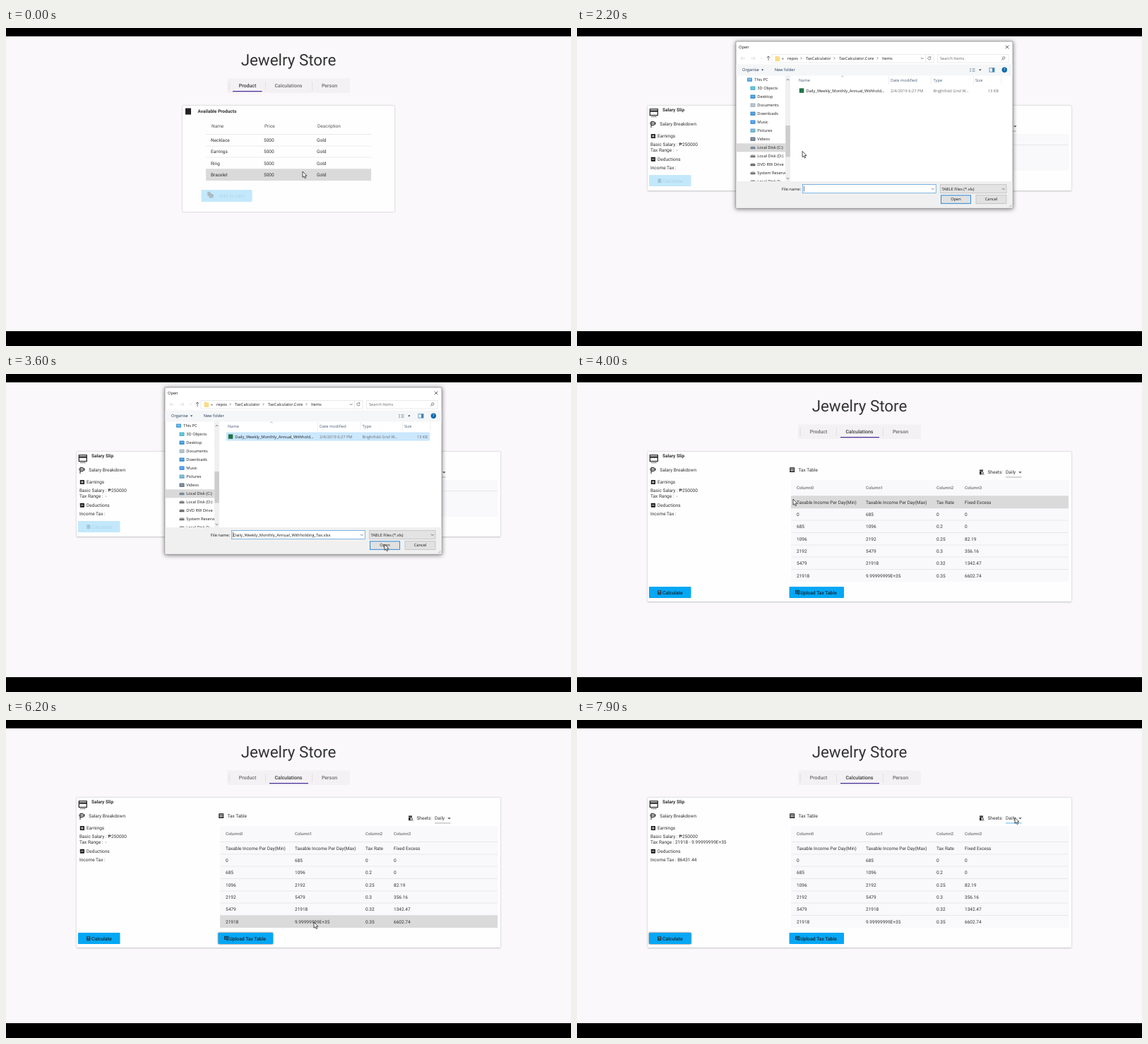
An HTML page that plays this animation: 800 by 450 pixels, repeating every 8000 ms.

```html
<!DOCTYPE html>
<html lang="en">
<head>
<meta charset="utf-8">
<title>Jewelry Store</title>
<style>
  html, body { margin: 0; height: 100%; overflow: hidden; background: #faf8fb; }
  svg { position: fixed; inset: 0; width: 100%; height: 100%; }
  text { font: 6.5px Roboto, sans-serif; fill: #333; text-rendering: geometricPrecision; white-space: pre; }
  .card { fill: #fefefe; filter: drop-shadow(0 .8px .7px #0007) drop-shadow(0 .4px 1.2px #0004); }
  .win text { font-family: "Open Sans", "Noto Sans", sans-serif; }
  .frame { filter: drop-shadow(0 1px 3px #0008); }
  .focus { filter: drop-shadow(0 .8px .8px #000a); }
</style>
</head>
<body>
<svg id="stage" viewBox="0 0 800 450"></svg>
<script>
const LOOP = 8000, STEP = 100;

// Markup helpers: text is placed by its vertical centre.
const text = (x, cy, s, o = {}) => {
  const size = o.size || 6.5;
  return `<text x="${x}" y="${cy + size * 0.355}" style="font-size:${size}px;font-weight:${o.weight || 400};` +
    `${o.fill ? `fill:${o.fill};` : ''}text-anchor:${o.anchor || 'start'}"${o.id ? ` id="${o.id}"` : ''}>${s}</text>`;
};
const label = (x, cy, s, fill = '#1b1b1b', anchor) => text(x, cy, s, { size: 5.7, fill, anchor });
const rect = (x, y, w, h, fill, more = '') => `<rect x="${x}" y="${y}" width="${w}" height="${h}" fill="${fill}" ${more}/>`;
const box = (x, y, w, h, fill, stroke, sw = 0.6, more = '') =>
  rect(x, y, w, h, fill, `stroke="${stroke}" stroke-width="${sw}" ${more}`);
const fillPath = (d, fill = '#222') => `<path d="${d}" fill="${fill}"/>`;
const line = (d, stroke = '#222', sw = 0.8) => `<path d="${d}" fill="none" stroke="${stroke}" stroke-width="${sw}"/>`;
const group = (id, body, more = '') => `<g id="${id}" ${more}>${body}</g>`;

const products = {
  left: 283, right: 517, edges: [150.5, 167, 183, 199.5, 216], cols: [290, 365, 440],
  rows: ['Necklace', 'Earrings', 'Ring', 'Bracelet'].map(n => [n, '5000', 'Gold'])
};
const taxes = {
  left: 303, right: 696, edges: [172.5, 190, 207, 224.5, 242, 259, 276.5, 294], cols: [311, 409, 509, 549],
  rows: [
    ['Taxable Income Per Day(Min)', 'Taxable Income Per Day(Max)', 'Tax Rate', 'Fixed Excess'],
    ['0', '685', '0', '0'],
    ['685', '1096', '0.2', '0'],
    ['1096', '2192', '0.25', '82.19'],
    ['2192', '5479', '0.3', '356.16'],
    ['5479', '21918', '0.32', '1342.47'],
    ['21918', '9.99999999E+35', '0.35', '6602.74']
  ]
};

const rowsOf = (table, hoverId) => {
  const { left, right, edges, cols, rows } = table, w = right - left;
  return edges.slice(0, -1).map(y => rect(left, y - 0.3, w, 0.6, '#dedde0')).join('') +
    rect(left, 0, w, 17, '#dbdadb', `id="${hoverId}"`) +
    rows.map((row, r) => row.map((s, c) => text(cols[c], (edges[r] + edges[r + 1]) / 2, s)).join('')).join('');
};

const calcIcon = (x, y, fill) => rect(x, y, 5, 6, fill, 'rx=".5"') +
  rect(x + 1, y + 0.9, 3, 1, '#7cc8ee') + line(`M${x + 1} ${y + 3.2}h3M${x + 1} ${y + 4.7}h3`, '#7cc8ee', 0.5);
const gridIcon = (x, y) => rect(x, y, 7, 6.6, '#222', 'rx=".5"') +
  line(`M${x + 0.7} ${y + 2}h5.6M${x + 0.7} ${y + 4.2}h5.6M${x + 2.5} ${y + 1}v5M${x + 4.6} ${y + 1}v5`, '#fff', 0.6);

const header =
  text(400, 45.2, 'Jewelry Store', { size: 22.4, anchor: 'middle', fill: '#333' }) +
  rect(313, 71.5, 174, 20.5, '#f3f1f4') +
  [316, 367.5, 433.5].map(x => rect(x - 0.3, 76, 0.7, 12, '#d9d8db')).join('') +
  [['Product', 342], ['Calculations', 400], ['Person', 458]].map(([s, x], i) =>
    text(x, 81.7, s, { size: 7, weight: 500, anchor: 'middle', id: 'tab' + i })).join('') +
  rect(321, 89, 41.5, 1.2, '#452a98', 'id="underline"');

const productPage =
  rect(250, 110, 300, 150, '#fefefe', 'rx="1" class="card"') +
  rect(254, 113.5, 8, 9, '#222') +
  text(271.5, 117.8, 'Available Products', { weight: 700 }) +
  text(291, 138.4, 'Name', { fill: '#555' }) + text(366, 138.4, 'Price', { fill: '#555' }) +
  text(441, 138.4, 'Description', { fill: '#555' }) +
  rowsOf(products, 'productHover') +
  rect(276.5, 229, 72, 17, '#c3e8fb', 'rx="1"') +
  fillPath('M285 232.5l4-1 .8 2.5 3.7 1.5.5 2.5-1.5 2.5h-4.5l-.6-2.4-2-1z', '#a9b9c2') +
  text(302, 237.4, 'Add to Cart', { size: 7, weight: 500, fill: '#b2d9ec' });

const salaryPage =
  rect(100, 110, 600, 120.5, '#fefefe', 'rx="1" class="card" id="card"') +
  // Card, peso and section icons
  box(103.3, 114.7, 11, 8.8, 'none', '#222', 1.2) + rect(103, 116.5, 11.5, 2.2, '#222') +
  line('M105.5 125.5h1.6M108.1 125.5h1.6M110.7 125.5h1.6', '#222', 1.2) +
  line('M105 141v-8.5h3a2.5 2.5 0 0 1 0 5H105', '#222', 1) + line('M103 134.2h9M103 135.9h9', '#222', 0.7) +
  rect(104.8, 150, 6.2, 6, '#222', 'rx=".6"') + line('M106 153h3.8M107.9 151.1v3.8', '#fff', 0.8) +
  rect(104.8, 182.7, 6.2, 6, '#222', 'rx=".6"') + line('M106 185.7h3.8', '#fff', 0.8) +
  text(121, 115.4, 'Salary Slip', { weight: 700 }) +
  text(117.3, 135.4, 'Salary Breakdown') +
  text(114, 153, 'Earnings') +
  text(104, 165, 'Basic Salary : ₱250000') +
  text(104, 173, '', { id: 'range' }) +
  text(114, 185.8, 'Deductions') +
  text(104, 198, '', { id: 'tax' }) +
  gridIcon(301.2, 132.3) + text(313.5, 135.4, 'Tax Table') +
  group('sheets',
    rect(577, 135.5, 5, 2, '#222') + rect(577, 138, 3, 4.2, '#222') +
    `<circle cx="580.6" cy="140" r="1.7" fill="#fefefe" stroke="#222" stroke-width=".9"/>` +
    line('M581.6 141.2l1.5 1.5', '#222', 0.9) + text(588.5, 138.6, 'Sheets:')) +
  text(607, 138.6, 'Daily', { id: 'daily' }) +
  group('arrow', fillPath('M618 138.2h4.6l-2.3 2.3z', '#555')) +
  rect(614, 145.6, 8, 0.7, '#888', 'id="selectLine"') +
  group('emptyTable', rect(303, 150, 393, 51.5, '#f9f8fa') + rect(303, 165.2, 393, 0.6, '#dedde0')) +
  group('taxTable', rect(303, 150, 393, 144, '#f9f8fa') +
    taxes.cols.map((x, i) => text(x, 160.5, 'Column' + i, { size: 6, weight: 500, fill: '#757575' })).join('') +
    rowsOf(taxes, 'taxHover')) +
  group('buttons',
    group('calcOff', rect(102, 208, 59.5, 16, '#c3e8fb', 'rx="1"') + calcIcon(114.3, 213.2, '#aac7d5') +
      text(121, 216.3, 'Calculate', { size: 6.85, weight: 500, fill: '#aed6ea' })) +
    group('calcOn', rect(102, 208, 59.5, 16, '#06a7f5', 'rx="1" id="calcBox"') + calcIcon(114.3, 213.2, '#182c38') +
      text(121, 216.3, 'Calculate', { size: 6.85, weight: 500, fill: '#14242e' })) +
    rect(300.5, 208, 77.5, 16, '#06a7f5', 'rx="1" id="uploadBox"') +
    box(309.5, 213.3, 5.2, 4.2, 'none', '#182c38', 0.9) + line('M309.5 215.3h5.2M312 213v4.5M312.5 218.7h3', '#182c38', 0.8) +
    text(316.3, 216.3, 'Upload Tax Table', { size: 6.8, weight: 500, fill: '#14242e' }));

const places = [
  ['This PC', '#3d9ad6'], ['3D Objects', '#3bb0c9'], ['Desktop', '#2586d0'], ['Documents', '#9fb2c0'],
  ['Downloads', '#2b83c9'], ['Music', '#2c86e0'], ['Pictures', '#5aa5c7'], ['Videos', '#5b6a80'],
  ['Local Disk (C:)', '#6f8496'], ['Local Disk (D:)', '#777'], ['DVD RW Drive', '#666'],
  ['System Reserved', '#777'], ['Local Disk D:', '#777']
];
const sidebar = places.map(([s, c], i) => {
  const y = 73.2 + i * 12, x = i ? 245.5 : 241, disk = i > 7;
  return rect(x, y - (disk ? 1 : 2.6), 7, disk ? 3 : 5.2, c, 'rx=".5"') +
    (disk ? rect(x + 1, y - 2, 5, 1, '#aab4bc') : rect(x + 1, y - 1.6, 5, 2.6, '#fff', 'opacity=".3"')) +
    label(i ? 255.3 : 251.3, y, s);
}).join('');

const dialog =
  box(225, 19, 392, 236, '#fff', '#8a8a8a', 0.7, 'class="frame"') +
  label(229, 26.8, 'Open') + line('M606.8 24.6l4.6 4.6M611.4 24.6l-4.6 4.6', '#222', 0.7) +
  // Address bar
  line('M238 43h-6M234.3 40.7l-2.3 2.3 2.3 2.3M246 43h6M249.7 40.7l2.3 2.3-2.3 2.3M260 42.3l1.3 1.3 1.3-1.3', '#cfcfcf', 0.7) +
  line('M271 46v-6M268.8 42.2l2.2-2.3 2.2 2.3', '#555', 0.8) +
  box(276, 37.5, 229, 11.5, '#fff', '#dcdcdc') + rect(493.3, 37.5, 0.6, 11.5, '#dcdcdc') +
  fillPath('M280.5 39.5h3l1 1h2.5v6.5h-6.5z', '#f8dc85') +
  label(290, 42.6, '«') + label(298, 42.6, 'repos') + label(324, 42.6, 'TaxCalculator') +
  label(371, 42.6, 'TaxCalculator.Core') + label(432, 42.6, 'Items') +
  [317.5, 364.5, 425.5].map(x => line(`M${x - 0.8} 41.2l1.5 1.6-1.5 1.6`, '#444', 0.6)).join('') +
  line('M487 42l1.8 1.8 1.8-1.8', '#444', 0.7) + line('M500.4 41.4a2.1 2.1 0 1 0 .6 1.7M500.8 40.2v1.6h-1.7', '#444', 0.6) +
  box(510.5, 37.5, 100.5, 11.5, '#fff', '#dcdcdc') + label(514, 43, 'Search Items', '#6d6d6d') +
  `<circle cx="604.2" cy="42.4" r="1.7" fill="none" stroke="#555" stroke-width=".7"/>` + line('M603 43.7l-1.8 1.9', '#555', 0.8) +
  // Toolbar
  rect(225.5, 51.5, 391, 16, '#f5f6f7') + label(234, 59.3, 'Organise', '#1e395b') + fillPath('M261 58.6h3.2l-1.6 1.8z', '#1e395b') +
  label(279.7, 59.3, 'New folder', '#1e395b') +
  line('M556 57.5h2M556 59.5h2M556 61.5h2M559.5 57.5h4M559.5 59.5h4M559.5 61.5h4', '#8a9aa8', 0.9) +
  fillPath('M569.2 58.6h3.2l-1.6 1.8z') + box(584, 56.7, 7, 5.4, '#fff', '#4384b5', 0.8) + rect(588, 56.7, 3, 5.4, '#4384b5') +
  `<circle cx="605.3" cy="59.3" r="3.7" fill="#0b69ad"/>` + label(605.3, 59.4, '?', '#fff', 'middle') +
  // Folder tree
  `<g clip-path="url(#tree)">${rect(225.5, 163.3, 69.5, 12, '#d9d9d9')}${sidebar}</g>` +
  rect(295, 67.5, 7, 149.5, '#f0f0f0') + rect(295.3, 138, 6.5, 44.5, '#cdcdcd') +
  line('M296.8 74l1.7-1.7 1.7 1.7M296.8 212l1.7 1.7 1.7-1.7', '#505050', 0.8) +
  // File list
  [['Name', 314], ['Date modified', 444], ['Type', 504.5], ['Size', 564]].map(([s, x]) => label(x, 74, s, '#4c607a')).join('') +
  [441, 501, 561, 600.5].map(x => rect(x, 68, 0.6, 12, '#e3e3e3')).join('') +
  line('M374 69.3l1.8-1.5 1.8 1.5', '#777', 0.5) +
  box(312.5, 83, 287, 11, '#cce8ff', '#b0dbfa', 0.6, 'id="fileRow"') +
  rect(314.8, 85.3, 6.5, 6.5, '#217346') +
  label(324.3, 88.5, 'Daily_Weekly_Monthly_Annual_Withhold...') +
  label(444, 88.5, '2/4/2019 6:27 PM', '#6d6d6d') + label(504.5, 88.5, 'Brightfold Grid W...', '#6d6d6d') +
  label(597, 88.5, '13 KB', '#6d6d6d', 'end') +
  // Footer
  rect(225.5, 217, 391, 37.6, '#f0f0f0') + label(317, 227.5, 'File name:', undefined, 'end') +
  box(319.6, 221.6, 188.6, 12, '#fff', '#2f8ad4', 0.6) + line('M502 226.8l1.8 1.8 1.8-1.8', '#444', 0.7) +
  group('fileName', label(321.8, 227.7, 'Daily_Weekly_Monthly_Annual_Withholding_Tax.xlsx')) + rect(321.3, 223.5, 0.6, 8, '#222') +
  box(514.5, 221.6, 93.5, 12, '#e3e3e3', '#b4b4b4') + label(516.5, 227.5, 'TABLE Files (*.xls)') +
  line('M602 226.8l1.8 1.8 1.8-1.8', '#444', 0.7) +
  box(515.5, 236.8, 42, 11.5, '#e1e1e1', '#1c80d3', 0.9) + label(536.5, 242.4, 'Open', undefined, 'middle') +
  box(565, 236.6, 43, 12, '#e1e1e1', '#b4b4b4') + label(586.5, 242.4, 'Cancel', undefined, 'middle') +
  line('M612 253.5l3.5-3.5M614 253.5l1.5-1.5', '#aaa', 0.8);

const stage = document.getElementById('stage');
stage.innerHTML =
  '<clipPath id="tree"><rect x="225.5" y="67.5" width="69.5" height="149.5"/></clipPath>' +
  rect(0, 0, 800, 450, '#faf8fb') + header +
  group('productPage', productPage) + group('salaryPage', salaryPage) +
  group('dialog', dialog, 'class="win"') +
  rect(0, 0, 800, 11.8, '#000') + rect(0, 429, 800, 21, '#000') +
  group('cursor', '<path d="M0 0v8.3l1.9-1.7 1.3 3 1.5-.7-1.3-2.8h2.5z" fill="#fff" stroke="#222" stroke-width=".8"/>');

const $ = id => document.getElementById(id);
const show = (id, on) => { $(id).style.display = on ? '' : 'none'; };
const set = (id, attrs) => { for (const k in attrs) $(id).setAttribute(k, attrs[k]); };

// Pointer stops: time, x, y
const path = [
  [0, 420, 203], [700, 397, 80.5], [900, 397, 80.5], [1700, 325, 209], [1800, 317, 206], [2000, 317, 206],
  [2600, 325, 84], [2900, 325, 84], [3500, 536, 241], [3700, 536, 241], [4000, 306, 177], [4600, 307, 175],
  [5100, 359, 276], [5500, 150, 303], [6200, 436, 286], [6400, 421, 300], [6800, 150, 304],
  [7000, 150, 304], [7300, 150, 253], [7900, 620, 138], [LOOP, 620, 138]
];
const pointer = t => {
  const i = path.findIndex(p => p[0] > t), [t0, x0, y0] = path[i - 1], [t1, x1, y1] = path[i];
  const u = (t - t0) / (t1 - t0), e = u * u * (3 - 2 * u);
  return [x0 + (x1 - x0) * e, y0 + (y1 - y0) * e];
};

const hover = (id, { left, right, edges }, x, y, active) => {
  const r = edges.findIndex((top, i) => y >= top && y < edges[i + 1]);
  const on = active && r >= 0 && x >= left && x < right;
  show(id, on);
  if (on) set(id, { y: edges[r], height: edges[r + 1] - edges[r] });
};

function draw(t) {
  const [x, y] = pointer(t);
  const salary = t >= 900, open = t >= 2000 && t < 3800, loaded = t >= 3900, done = t >= 7000;
  const picked = t >= 2700;

  show('productPage', !salary);
  show('salaryPage', salary);
  [0, 1, 2].forEach(i => { $('tab' + i).style.fill = i === +salary ? '#3a3a3a' : '#6a6a6a'; });
  set('underline', salary ? { x: 373, width: 55 } : { x: 321, width: 41.5 });

  set('card', { height: loaded ? 212.5 : 120.5 });
  set('buttons', { transform: `translate(0 ${loaded ? 93 : 0})` });
  set('sheets', { transform: `translate(${loaded ? -7 : 0} 0)` });
  set('arrow', { transform: `translate(${loaded ? 7.2 : 0} 0)` });
  const overSelect = loaded && x > 604 && y > 130 && y < 147;
  set('selectLine', { x: loaded ? 607 : 614, width: loaded ? 22.5 : 8, fill: overSelect ? '#1a9be0' : '#888' });
  ['daily', 'taxTable', 'calcOn'].forEach(id => show(id, loaded));
  ['emptyTable', 'calcOff'].forEach(id => show(id, !loaded));
  $('calcBox').classList.toggle('focus', done);
  $('uploadBox').classList.toggle('focus', t >= 4100 && !done);
  $('range').textContent = 'Tax Range : ' + (done ? '21918 - 9.99999999E+35' : ' - ');
  $('tax').textContent = 'Income Tax : ' + (done ? '86431.44' : '');

  hover('productHover', products, x, y, !salary);
  hover('taxHover', taxes, x, y, loaded);

  show('dialog', open);
  $('dialog').style.opacity = t < 2100 ? 0.6 : t >= 3700 ? 0.5 : 1;
  const overFile = y > 82 && y < 95;
  set('fileRow', { fill: picked ? '#cce8ff' : overFile ? '#e5f3ff' : '#fff', stroke: picked ? '#b0dbfa' : 'none' });
  show('fileName', picked);

  set('cursor', { transform: `translate(${x} ${y})` });
}

function tick() {
  const t = performance.now() % LOOP;
  draw(Math.floor(t / STEP) * STEP);
  requestAnimationFrame(tick);
}
tick();
</script>
</body>
</html>
```
